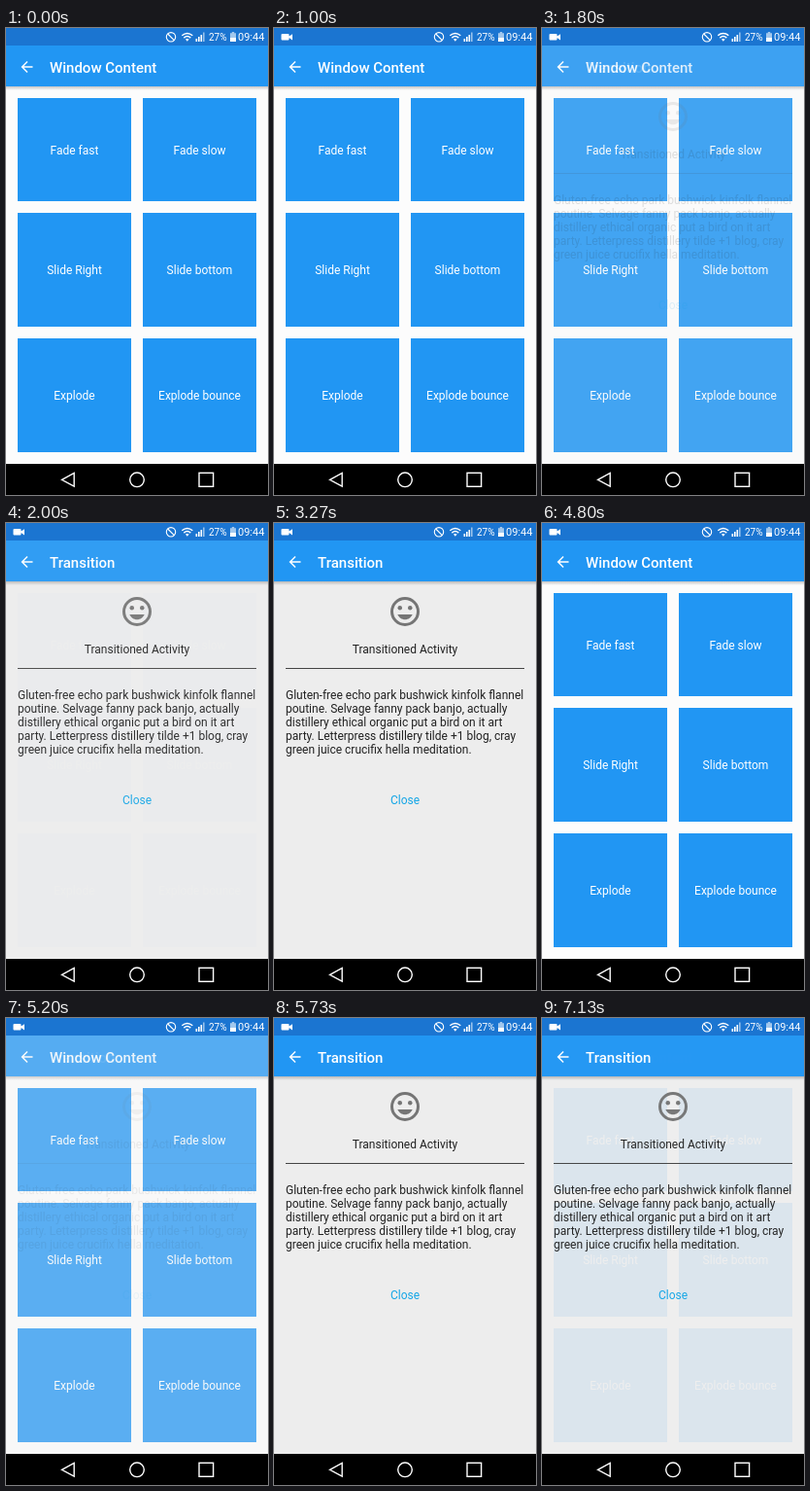
These frames come from a looping animation (270x480 px, 7190 ms). An HTML page:

```html
<!DOCTYPE html>
<html lang="en">
<head>
<meta charset="utf-8">
<title>Window content transition</title>
<style>
  html, body { margin: 0; width: 100%; height: 100%; overflow: hidden; background: #000; }
  svg { display: block; width: 100vw; height: 100vh; font: 12px Roboto, sans-serif; }
  .title { font-size: 15px; font-weight: 500; }
  .mid { text-anchor: middle; }
</style>
</head>
<body>
<svg viewBox="0 0 270 480">
  <defs>
    <linearGradient id="shade" x2="0" y2="1">
      <stop stop-color="#000" stop-opacity=".22"/>
      <stop offset="1" stop-color="#000" stop-opacity="0"/>
    </linearGradient>
    <g id="bar">
      <rect y="60" width="270" height="4" fill="url(#shade)"/>
      <rect y="18" width="270" height="42" fill="#2196f3"/>
      <path transform="translate(12.5 31) scale(.75)" fill="#fff"
        d="M20 11H7.83l5.59-5.59L12 4l-8 8 8 8 1.41-1.41L7.83 13H20z"/>
    </g>
  </defs>

  <g id="home">
    <rect y="18" width="270" height="430" fill="#fcfcfc"/>
    <use href="#bar"/>
    <text class="title" x="45" y="46" fill="#fff">Window Content</text>
    <g id="tiles" class="mid"></g>
  </g>

  <rect id="backdrop" y="18" width="270" height="430" fill="#ededed"/>

  <g id="detail" fill="#212121">
    <use href="#bar"/>
    <text class="title" x="45" y="46" fill="#fff">Transition</text>
    <g transform="translate(117 73) scale(1.5)" fill="#757575">
      <circle cx="12" cy="12" r="9" fill="none" stroke="#757575" stroke-width="2"/>
      <circle cx="8.5" cy="9.5" r="1.5"/>
      <circle cx="15.5" cy="9.5" r="1.5"/>
      <path d="M12 17.5c2.33 0 4.31-1.46 5.11-3.5H6.89c.8 2.04 2.78 3.5 5.11 3.5z"/>
    </g>
    <text class="mid" x="135" y="133.5">Transitioned Activity</text>
    <rect x="12" y="149" width="246" height="1" fill="#444"/>
    <g id="copy"></g>
    <text class="mid" x="135" y="289" fill="#12a5e6">Close</text>
  </g>

  <g id="status" fill="#fff">
    <rect width="270" height="18" fill="#1b75d1"/>
    <path id="camera" d="M8.5 6h6q1 0 1 1v1.6L19 6.2v6.2l-3.500-2.400V11.500q0 1-1 1h-6q-1 0-1-1V7q0-1 1-1z"/>
    <g fill="none" stroke="#fff" stroke-width="1.1">
      <circle cx="170" cy="9.300" r="4.700"/>
      <path d="M166.700 6l6.600 6.600"/>
      <path stroke-width="1.400" d="M181.300 7.800q5.500-4.800 11 0M183.300 10.100q3.500-3 7 0"/>
    </g>
    <path d="M184.900 11.600q1.900-1.400 3.800 0l-1.900 2.200z"/>
    <path d="M195.500 11h1.600v3h-1.600zM198 9h1.600v5h-1.600zM200.500 7h1.600v7h-1.600z"/>
    <path opacity=".55" d="M203 4.500h1.600v9.500h-1.600z"/>
    <text x="209" y="13" font-size="10">27%</text>
    <path opacity=".6" d="M232.800 4h2.400v1.200h1.800v4.800h-6V5.200h1.800z"/>
    <path d="M231 10h6v4h-6z"/>
    <text x="239" y="13.300" font-size="11">09:44</text>
  </g>

  <rect y="448" width="270" height="32"/>
  <g fill="none" stroke="#fff" stroke-width="1.400">
    <path d="M57.500 464.300l12.700-6.800v13.600z"/>
    <circle cx="135" cy="464.300" r="7.300"/>
    <rect x="199" y="457.300" width="14.600" height="14"/>
  </g>
</svg>
<script>
  const LOOP = 7190, STEP = 1000 / 15;
  const $ = id => document.getElementById(id);

  const rows = [
    [72, 106, "Fade fast", "Fade slow"],
    [190, 117, "Slide Right", "Slide bottom"],
    [319, 117, "Explode", "Explode bounce"]
  ];
  $("tiles").innerHTML = rows.map(([y, h, ...labels]) => labels.map((label, i) => {
    const x = 12 + i * 129;
    return `<rect x="${x}" y="${y}" width="117" height="${h}" fill="#2196f3"/>
      <text x="${x + 58.5}" y="${y + h / 2 + 4.8}" fill="#fff">${label}</text>`;
  }).join("")).join("");

  $("copy").innerHTML = [
    "Gluten-free echo park bushwick kinfolk flannel",
    "poutine. Selvage fanny pack banjo, actually",
    "distillery ethical organic put a bird on it art",
    "party. Letterpress distillery tilde +1 blog, cray",
    "green juice crucifix hella meditation."
  ].map((line, i) => `<text x="12" y="${180.5 + i * 14.05}">${line}</text>`).join("");

  // Each fade: start, end, target opacity.
  const fades = {
    backdrop: [[1720, 2025, 1], [3340, 3655, 0], [5090, 5400, 1], [7075, 7385, 0]],
    detail: [[1720, 2060, 1], [3290, 3590, 0], [5090, 5725, 1], [7075, 7715, 0]]
  };

  const ease = p => (1 - Math.cos(Math.PI * p)) / 2;

  function level(steps, t) {
    let value = 0;
    for (const [start, end, to] of steps) {
      const p = Math.min(1, Math.max(0, (t - start) / (end - start)));
      value += (to - value) * ease(p);
    }
    return value;
  }

  function draw() {
    const now = performance.now() % LOOP;
    const t = Math.floor((now + 4) / STEP) * STEP;
    for (const id in fades) $(id).setAttribute("opacity", level(fades[id], t));
    $("camera").setAttribute("visibility", now < 70 ? "hidden" : "visible");
    requestAnimationFrame(draw);
  }
  draw();
</script>
</body>
</html>
```
